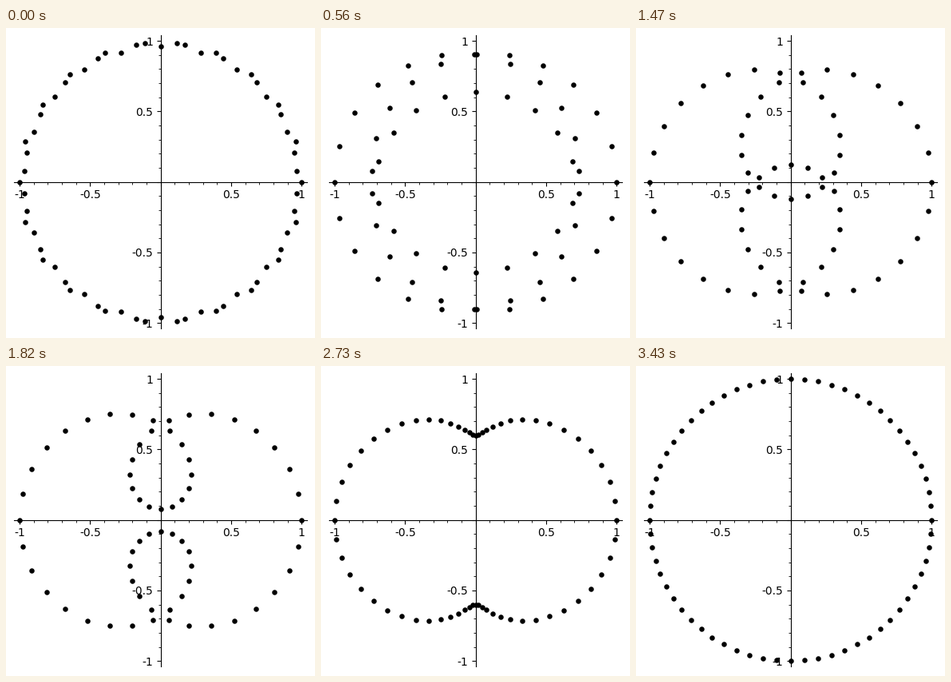
Animation of 387 by 388 pixels, one loop 3.5 s. Source, as a matplotlib script:

```python
import numpy as np
import matplotlib.pyplot as plt
from matplotlib.animation import FuncAnimation
from matplotlib.ticker import AutoMinorLocator, FuncFormatter, MultipleLocator

WIDTH, HEIGHT, DPI = 387, 388, 100
FRAMES, INTERVAL = 50, 70
POINTS = 64
LIMIT = 1.04
UNIT = 176.63                   # pixels per axis unit
CENTER = (193.6, 195.32)        # origin in pixels from the lower left

plt.rcParams["font.family"] = "DejaVu Sans"
angles = 2 * np.pi * np.arange(POINTS) / POINTS


def curve(weight):
    """Blend the triple-speed circle into the single-speed one."""
    z = weight * np.exp(1j * angles) + (1 - weight) * np.exp(3j * angles)
    return np.column_stack([z.real, z.imag])


def tick_label(value, _):
    return "" if abs(value) < 1e-9 else f"{value:g}"


def make_axes(fig):
    half = LIMIT * UNIT
    ax = fig.add_axes([(CENTER[0] - half) / WIDTH, (CENTER[1] - half) / HEIGHT,
                       2 * half / WIDTH, 2 * half / HEIGHT])
    ax.set(xlim=(-LIMIT, LIMIT), ylim=(-LIMIT, LIMIT), facecolor="none")
    for side in ("left", "bottom"):
        ax.spines[side].set_position("zero")
    for side in ("right", "top"):
        ax.spines[side].set_visible(False)
    for axis in (ax.xaxis, ax.yaxis):
        axis.set_major_locator(MultipleLocator(0.5))
        axis.set_minor_locator(AutoMinorLocator(5))
        axis.set_major_formatter(FuncFormatter(tick_label))
    return ax


fig = plt.figure(figsize=(WIDTH / DPI, HEIGHT / DPI), dpi=DPI, facecolor="white")
ax = make_axes(fig)
dots = ax.scatter(*curve(1 / FRAMES).T, s=10, c="black", edgecolors="black",
                  linewidths=1.5)


def update(frame):
    dots.set_offsets(curve((frame + 1) / FRAMES))
    return (dots,)


animation = FuncAnimation(fig, update, frames=FRAMES, interval=INTERVAL,
                          repeat=True, repeat_delay=0)
plt.show()
```
